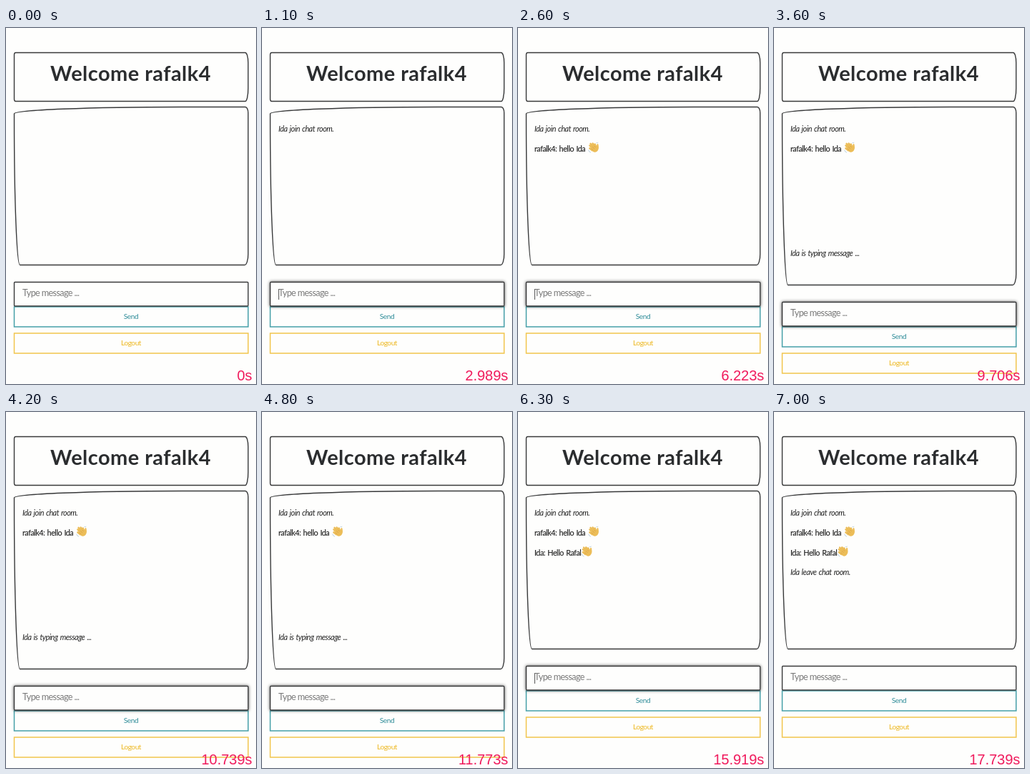
An HTML page for the animation above (7100 ms loop, 350 by 498 pixels).

```html
<!DOCTYPE html>
<html lang="en">
<head>
<meta charset="utf-8">
<title>Chat room</title>
<style>
  html, body { margin: 0; width: 100%; height: 100%; overflow: hidden; background: #fefefd; }
  svg { display: block; width: 350px; height: 498px; }
  text { font-family: Lato, sans-serif; white-space: pre; }
  .title { font-size: 29px; font-weight: 700; letter-spacing: .45px; fill: #2b2d2f; text-anchor: middle; }
  .line { font-size: 10.8px; letter-spacing: -.5px; word-spacing: 1.1px; fill: #222; stroke: #222; stroke-width: .15; }
  .note { font-style: italic; stroke: none; }
  .field { font-size: 12.7px; letter-spacing: -.65px; fill: #7a7a7a; }
  .btn { font-size: 10.2px; letter-spacing: -.5px; text-anchor: middle; }
  .clock { font: 20px "Liberation Sans", Arial, sans-serif; fill: #f01a5c; text-anchor: end; }
  .frame { fill: #fefefd; stroke: #38393a; stroke-width: 1.4; }
  .focus { filter: drop-shadow(0 0 2px rgba(0, 0, 0, .65)); }
</style>
</head>
<body>
<svg viewBox="0 0 350 498">
  <defs>
    <g id="wave" transform="scale(1.12)">
      <g fill="none" stroke="#ecbd58" stroke-width="2.2" stroke-linecap="round">
        <path d="M-1 1L-5 -3M0 -1L-4 -5.3M2 -2L-1.2 -5.6M3 -1L1.6 -4.6M-2 3L-5 .4"/>
      </g>
      <path d="M-3 2L2-3Q4-2 4.2-5Q6-6 6 -3Q7 2 4 4.5Q1 6.5-1.5 4Z" fill="#ecbd58"/>
      <path d="M-3.2 .6L-.6 3M-1.6-1.4L1 1.2M.6-2.6L2.4-.6" stroke="#d49c45" stroke-width=".6" fill="none"/>
      <path d="M-6.5 2.5Q-6 5-3.6 5.8M3.2-6.4Q5-6.2 5.6-6.8" stroke="#a9c6d6" stroke-width=".7" fill="none"/>
    </g>
  </defs>
  <path id="head" class="frame"/>
  <text class="title" x="174.5" y="74">Welcome rafalk4</text>
  <path id="room" class="frame"/>
  <g id="log"></g>
  <text id="typing" class="line note" x="23" y="319">Ida is typing message ...</text>
  <g id="form">
    <rect x="11.5" y="390" width="327.5" height="28" fill="none" stroke="#459fa9" stroke-width="1.5"/>
    <rect id="input" class="frame" x="11.5" y="355.5" width="327.5" height="33.5" rx="1"/>
    <text id="value" class="field" x="23" y="375"></text>
    <use id="hand" href="#wave"/>
    <path id="caret" d="M0 365v15" stroke="#555" stroke-width="1"/>
    <text class="btn" x="175" y="407.3" fill="#328e9a">Send</text>
    <rect x="11.5" y="427" width="327.5" height="28" fill="none" stroke="#f1c54d" stroke-width="1.5"/>
    <text class="btn" x="175" y="444" fill="#edb822">Logout</text>
  </g>
  <text id="clock" class="clock" x="344.6" y="493"></text>
</svg>
<script>
const LOOP = 7100, STEP = 100;
const $ = id => document.getElementById(id);
const show = (el, on) => el.setAttribute('visibility', on ? 'visible' : 'hidden');

// [loop ms, clock seconds]
const clockKeys = [[0, 0], [1100, 2.989], [2600, 6.223], [3600, 9.706],
  [4800, 11.773], [5500, 13.839], [7000, 17.739]];

const messages = [
  { at: 700, text: 'Ida join chat room.', note: true },
  { at: 2500, text: 'rafalk4: hello Ida', hand: 106 },
  { at: 6000, text: 'Ida: Hello Rafal', hand: 96.5 },
  { at: 6500, text: 'Ida leave chat room.', note: true }
];
const draft = { text: 'hello Ida ', from: 1300, hand: 2300, sent: 2500 };
const typingSpan = [3200, 5300];
const focusSpan = [900, 6600];
const within = (t, [a, b]) => t >= a && t < b;

// Rounded box with an elliptical radius pair per corner: tl, tr, br, bl.
function box(l, t, r, b, [tl, tr, br, bl]) {
  return `M${l} ${t + tl[1]}A${tl} 0 0 1 ${l + tl[0]} ${t}H${r - tr[0]}` +
    `A${tr} 0 0 1 ${r} ${t + tr[1]}V${b - br[1]}A${br} 0 0 1 ${r - br[0]} ${b}` +
    `H${l + bl[0]}A${bl} 0 0 1 ${l} ${b - bl[1]}Z`;
}

function add(parent, tag, attrs, text = '') {
  const el = document.createElementNS('http://www.w3.org/2000/svg', tag);
  for (const k in attrs) el.setAttribute(k, attrs[k]);
  el.textContent = text;
  return parent.appendChild(el);
}

messages.forEach((m, i) => {
  const y = 145 + i * 27.8;
  m.el = add($('log'), 'g', {});
  add(m.el, 'text', { class: m.note ? 'line note' : 'line', x: 23, y }, m.text);
  if (m.hand) add(m.el, 'use', { href: '#wave', x: m.hand, y: y - 5 });
});

$('head').setAttribute('d', box(11.5, 34.5, 339, 102.5, [[2, 3], [4, 14], [4, 18], [2, 3]]));

function seconds(t) {
  let i = 1;
  while (i < clockKeys.length - 1 && t > clockKeys[i][0]) i++;
  const [t0, s0] = clockKeys[i - 1], [t1, s1] = clockKeys[i];
  return s0 + (s1 - s0) * (t - t0) / (t1 - t0);
}

function draw(t) {
  const typing = within(t, typingSpan), drop = typing ? 28 : 0;
  const focus = within(t, focusSpan), s = seconds(t);

  $('room').setAttribute('d', box(11.5, 110.5, 339, 331.5 + drop,
    [[235, 9.5], [4, 8], [5, 15], [8, 205 + drop]]));
  messages.forEach(m => show(m.el, t >= m.at));
  show($('typing'), typing);
  $('form').setAttribute('transform', `translate(0 ${drop})`);
  $('input').classList.toggle('focus', focus);

  const open = t < draft.sent;
  const part = Math.min(1, (t - draft.from) / (draft.hand - draft.from));
  const count = open ? Math.max(0, Math.ceil(part * draft.text.length)) : 0;
  const value = $('value'), hand = open && t >= draft.hand;
  value.textContent = count ? draft.text.slice(0, count) : 'Type message ...';
  value.style.fill = count ? '#41403e' : '';

  const end = 23 + (count ? value.getComputedTextLength() : 0);
  show($('hand'), hand);
  $('hand').setAttribute('transform', `translate(${end + 8} 371)`);
  $('caret').setAttribute('transform', `translate(${end + (hand ? 16 : 0.5)} 0)`);
  show($('caret'), focus && (s + 0.1) % 1 < 0.5);

  $('clock').textContent = (t ? s.toFixed(3) : '0') + 's';
}

let start = null;
function tick(now) {
  if (start === null) start = now;
  draw(Math.floor((now - start) % LOOP / STEP) * STEP);
  requestAnimationFrame(tick);
}
draw(0);
requestAnimationFrame(tick);
</script>
</body>
</html>
```
